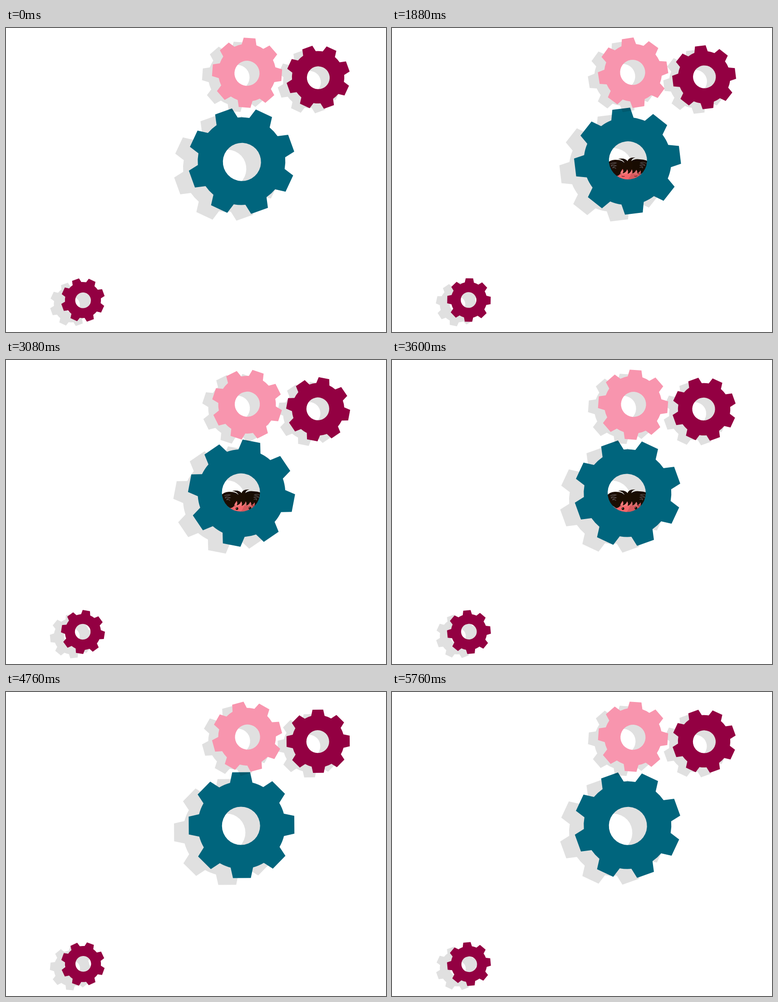
Animation of 837 by 669 pixels, one loop 5800 ms. Source, as an HTML page with a canvas:

```html
<!DOCTYPE html>
<html lang="en">
<head>
<meta charset="utf-8">
<title>Gears</title>
<style>
  html, body { margin: 0; width: 100%; height: 100%; overflow: hidden; background: #fff; }
  canvas { display: block; }
</style>
</head>
<body>
<canvas id="stage" width="837" height="669"></canvas>
<script>
const ctx = document.getElementById('stage').getContext('2d');
const LOOP = 5800, STEP = 40, TURN = 5760, RAD = Math.PI / 180;
const SHADE = '#e0e0e0';

// tooth: angle of one tooth from the top; hole: direction of the off-centre hole
const big = { x: 518.8, y: 293, size: 1, color: '#00657d', dir: -1, tooth: 25.1, hole: 62, dx: -32.3, dy: 15 };
const wine = { x: 687.5, y: 108.4, size: 0.598, color: '#930042', dir: -1, tooth: 25, hole: 70, dx: -19.5, dy: 10 };
const pink = { x: 531, y: 98.4, size: 0.658, color: '#f895ae', dir: 1, tooth: 4.1, hole: 98, dx: -22, dy: 9 };
const small = { x: 169.5, y: 598.6, size: 0.411, color: '#930042', dir: 1, tooth: 25, hole: 70, dx: -24.5, dy: 9.5, lag: true };

const clamp = u => Math.min(1, Math.max(0, u));
const ease = (t, from, to) => {
  const u = clamp((t - from) / (to - from));
  return u * u * (3 - 2 * u);
};

// Slightly uneven turn, one revolution per loop
function turnAt(t) {
  const x = t / TURN * 2 * Math.PI;
  return t / TURN * 360 + 3 * Math.sin(x) + 1.24 * (1 - Math.cos(x));
}

// Unit gear with its first tooth pointing up
function gearPath(holeAngle) {
  const p = new Path2D();
  const baseR = 96.5, baseHalf = Math.asin(24.7 / baseR);
  for (let i = 0; i < 8; i++) {
    const a = i * Math.PI / 4, c = Math.cos(a), s = Math.sin(a);
    const up = a - Math.PI / 2;
    p.arc(0, 0, baseR, up - Math.PI / 4 + baseHalf, up - baseHalf);
    for (const w of [-19.7, 19.7]) p.lineTo(w * c + 116.3 * s, w * s - 116.3 * c);
    p.lineTo(baseR * Math.cos(up + baseHalf), baseR * Math.sin(up + baseHalf));
  }
  p.closePath();
  const hx = 1.9 * Math.cos(holeAngle), hy = 1.9 * Math.sin(holeAngle);
  p.moveTo(hx + 42, hy);
  p.arc(hx, hy, 42, 0, 2 * Math.PI);
  return p;
}

const gears = [big, wine, pink, small];
for (const g of gears) g.path = gearPath((g.hole - g.tooth) * RAD);

function fillGear(g, x, y, angle, color, blend) {
  ctx.save();
  ctx.globalCompositeOperation = blend;
  ctx.translate(x, y);
  ctx.rotate((g.tooth + g.dir * angle) * RAD);
  ctx.scale(g.size, g.size);
  ctx.fillStyle = color;
  ctx.fill(g.path, 'evenodd');
  ctx.restore();
}

function drawGear(g, t) {
  const turn = turnAt(t);
  const lag = g.lag ? 30.4 * ease(t, 1040, 3140) : 0;
  fillGear(g, g.x + g.dx, g.y + g.dy, turn, SHADE, 'multiply');
  fillGear(g, g.x, g.y, turn - lag, g.color, 'source-over');
}

const skin = new Path2D('M488 308 Q488 348 522 350 Q558 348 558 306 Z');
const blush = new Path2D('M497 317 Q520 308 545 314 L541 322 Q520 318 501 324 Z');
const hair = new Path2D(
  'M472 300 Q480 289 493 290 Q507 290 512 297 Q510 290 498 288 Q513 285 519 293 ' +
  'Q521 284 536 285 Q528 287 527 293 Q534 287 546 289 Q562 289 570 299 ' +
  'Q566 314 556 321 Q557 316 555 314 Q553 320 547 321 Q549 317 547 313 ' +
  'Q545 319 540 319 Q541 315 538 312 Q535 319 529 320 Q531 315 528 311 ' +
  'Q526 319 519 321 Q521 315 518 311 Q515 319 508 320 Q511 314 508 310 ' +
  'Q504 315 502 322 Q499 325 494 326 Q478 318 472 300 Z');
const curls = new Path2D(
  'M481 299 Q487 295 494 297 Q481 301 483 304 Q489 301 494 303 Q485 306 486 308 Q490 306 493 309 ' +
  'M560 298 Q553 294 547 297 Q558 300 557 303 Q550 300 546 302 Q554 305 552 308 Q549 305 546 307');
const brows = new Path2D('M500 323 Q502 320 505 321 M541 320 Q544 320 546 322');
const lids = new Path2D('M506 326 Q509 327.5 512 326.5 M534 326 Q537 327 540 325.5');

function disc(x, y, r, color) {
  ctx.fillStyle = color;
  ctx.beginPath();
  ctx.arc(x, y, r, 0, 2 * Math.PI);
  ctx.fill();
}

function line(path, color, width) {
  ctx.strokeStyle = color;
  ctx.lineWidth = width;
  ctx.stroke(path);
}

function drawPeeker(t) {
  const shown = ease(t, 440, 840) - ease(t, 3840, 4240);
  if (shown <= 0) return;
  ctx.save();
  ctx.beginPath();
  ctx.arc(big.x, big.y, 60, 0, 2 * Math.PI);
  ctx.clip();
  ctx.translate(0, 60 * (1 - shown));
  ctx.lineCap = 'round';
  ctx.fillStyle = '#f4656a';
  ctx.fill(skin);
  ctx.fillStyle = '#f87c7c';
  ctx.fill(blush);
  ctx.fillStyle = '#1b0d02';
  ctx.fill(hair);
  line(curls, '#5d5455', 1.3);
  line(brows, '#3a1512', 1);
  if (t >= 1800 && t < 1960) {
    line(lids, '#3a1512', 1);
  } else {
    for (const [x, y] of [[508.7, 327], [537.3, 326]]) {
      disc(x, y, 2.9, '#1b0d02');
      disc(x - 0.9, y - 1, 0.8, '#fff');
    }
  }
  ctx.restore();
}

function frame(now) {
  const t = Math.floor(now % LOOP / STEP) * STEP;
  ctx.fillStyle = '#fff';
  ctx.fillRect(0, 0, 837, 669);
  drawPeeker(t);
  for (const g of gears) drawGear(g, t);
  requestAnimationFrame(frame);
}
frame(performance.now());
</script>
</body>
</html>
```
